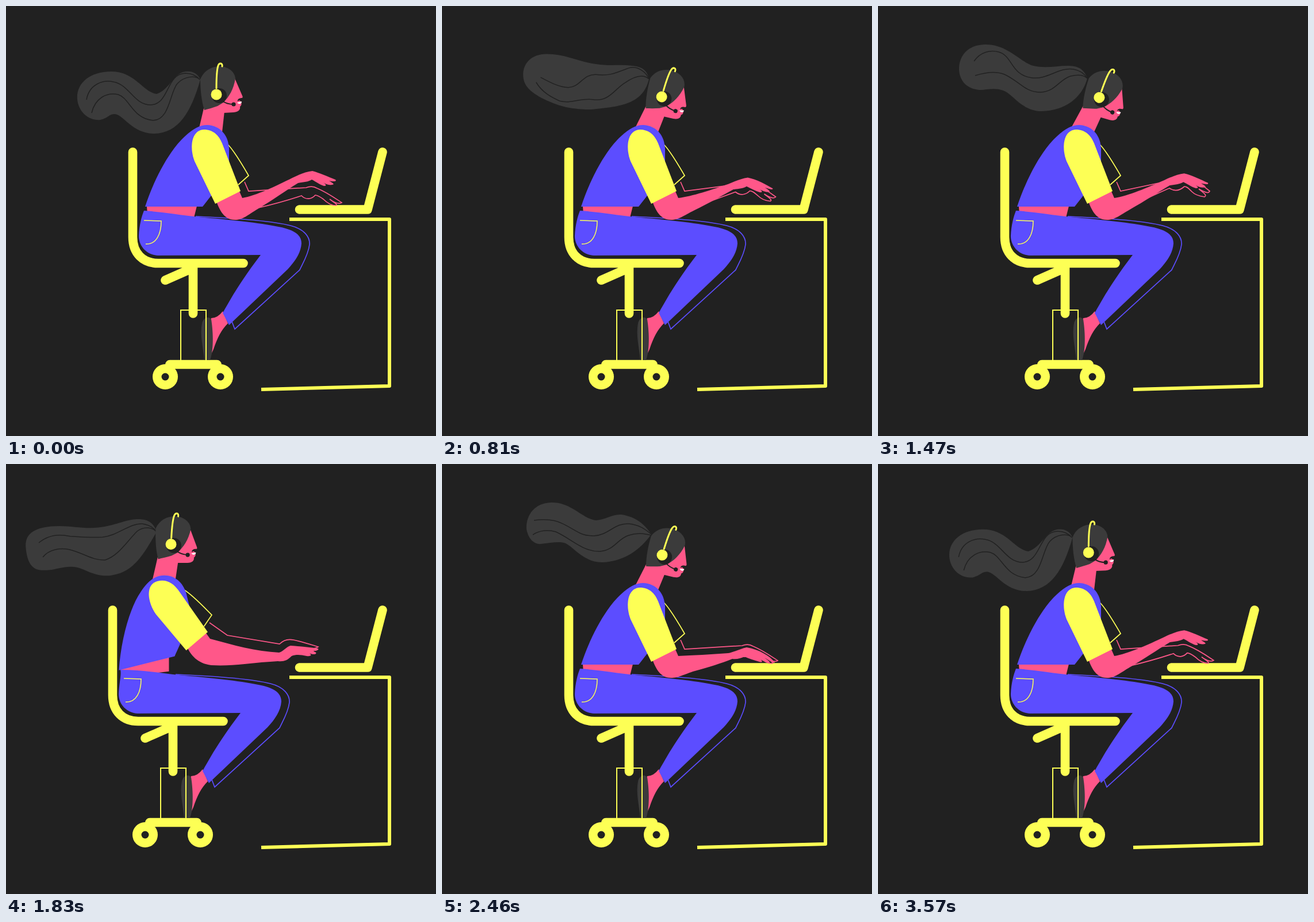
An HTML page for the animation above (3600 ms loop, 748 px wide and 748 px high).

```html
<!DOCTYPE html>
<html lang="en">
<head>
<meta charset="utf-8">
<title>Typing at the desk</title>
<style>
html, body { margin: 0; width: 100%; height: 100%; overflow: hidden; background: #212121; }
svg { display: block; width: 100vw; height: 100vh; }
.y { fill: #fdff55; } .b { fill: #5c4dff; } .p { fill: #ff5789; } .g { fill: #3b3b3b; } .k { fill: #212121; }
.line { fill: none; stroke-width: 1.7; }
.tube { fill: none; stroke-width: 15.6; stroke-linecap: round; stroke-linejoin: round; }
.ys { stroke: #fdff55; } .bs { stroke: #5c4dff; } .ps { stroke: #ff5789; } .ks { stroke: #212121; }
</style>
</head>
<body>
<svg viewBox="0 0 748 748">
  <rect class="k" width="748" height="748"/>
  <path class="line ys" style="stroke-width:6;stroke-linejoin:round" d="M493 371H667V661L444 667"/>
  <path class="tube ys" d="M510.500 354H629L655 254"/>
  <g id="body">
    <g id="chair">
      <path class="tube ys" d="M220.500 254V402C220.500 430 238 447.500 265 447.500H413M277 477L320 458M325.500 455V535M285 623.500H367"/>
      <g class="y"><circle cx="277" cy="645" r="22"/><circle cx="373" cy="645" r="22"/></g>
      <g class="k"><circle cx="277" cy="645" r="6.500"/><circle cx="373" cy="645" r="6.500"/></g>
      <path class="p" d="M377 531L386 552C375 563 368 576 361 597L354 612L350 565L357 543Q368 543 377 531Z"/>
      <path class="g" d="M357 545C351 538 343 543 341 552C337 572 343 595 345 615L355 616C361 600 361 570 357 545Z"/>
      <path class="line ys" style="stroke-width:2" d="M304 617V529H348V617"/>
    </g>
    <path id="neck" class="p"/>
    <g id="torsoBack">
      <path class="p" d="M245 349L248 344H333L326 372L246 362Z"/>
      <path class="line ys" d="M386 241C396 251 411 276 422 295L404 311"/>
      <path class="b" d="M242 349C258 300 285 250 312 226C325 214 337 207 350 207C372 208 387 224 388 248L388 272C384 298 360 326 342 349Z"/>
    </g>
    <path class="line bs" d="M330 366C400 369 463 374 495 382C519 388 529 402 528 415C526 432 515 450 511 459L398 562L393 549"/>
    <path id="pants" class="b"/>
    <path class="line ys" style="stroke-width:1.500" d="M240 373L270 374C270 396 262 415 243 414"/>
    <path id="farArm" class="line ps"/>
    <path id="nearArm" class="p"/>
    <path id="sleeve" class="y" d="M364 344L328 270C319 247 322 216 344 215C361 215 370 225 376 239L408 322Z"/>
    <g id="head">
      <path id="hair" class="g"/>
      <path id="strands" class="line ks" style="stroke-width:1.500"/>
      <path class="p" d="M345 180L360 150L398 126L411 156C413 160 410 161 406 161C404 163 406 165 409 166C410 170 410 173 407 175C408 180 405 184 396 185L378 186Z"/>
      <path class="g" d="M338 128C344 112 358 105 373 105C388 106 398 115 399 126C396 145 388 158 378 168L368 174C360 177 352 179 345 181C340 165 338 145 338 128Z"/>
      <path fill="#fff" d="M402 168L410 166C410 170 406 172 402 168Z"/>
      <path class="k" d="M411 160C406 160 402 162 403 166C405 164 408 163 411 160Z"/>
      <circle class="k" cx="371" cy="156" r="13"/>
      <path class="line ks" style="stroke-width:2" d="M376 165Q384 171 396 171"/>
      <circle class="k" cx="396" cy="171" r="3.600"/>
      <circle class="y" cx="366" cy="154" r="9.500"/>
      <path class="line ys" style="stroke-width:3;stroke-linecap:round" d="M366 143C366 130 366 113 369 104C371 98 377 99 376 105"/>
    </g>
  </g>
</svg>
<script>
const LOOP = 3600, HIP = [276, 397], NECK = [360, 213], TILT = -14;
const $ = id => document.getElementById(id);
const lerp = (a, b, k) => a + (b - a) * k;
const nums = d => d.match(/-?[\d.]+/g).map(Number);
const fill = (shape, values) => { let i = 0; return shape.replace(/-?[\d.]+/g, () => values[i++].toFixed(2)); };
const mix = (a, b, k) => a.map((v, i) => lerp(v, b[i], k));

function turn([x, y], [cx, cy], deg) {
  const a = deg * Math.PI / 180, c = Math.cos(a), s = Math.sin(a);
  return [cx + (x - cx) * c - (y - cy) * s, cy + (x - cx) * s + (y - cy) * c];
}

// Cosine easing through [time, value] pairs
function track(keys, t) {
  let i = 1;
  while (i < keys.length - 1 && keys[i][0] < t) i++;
  const [t0, a] = keys[i - 1], [t1, b] = keys[i];
  const k = Math.min(1, Math.max(0, (t - t0) / (t1 - t0)));
  return lerp(a, b, (1 - Math.cos(Math.PI * k)) / 2);
}

// Alternates 0 and 1 at the given times
const swing = (times, first = 0) => times.map((t, i) => [t, (i + first) % 2]);

const leanKeys = [[1620, 0], [1860, 1.04], [2160, 1.04], [2430, 0]];
const nodKeys = [[540, 0], [840, 16.5], [1470, 19], [1620, 19], [1830, 3], [2160, 3], [2430, 17], [3240, 17], [3600, 0]];
const nearKeys = [
  ...swing([0, 185, 370, 555, 740, 912, 1085, 1257, 1430, 1600]),
  ...swing([2460, 2616, 2772, 2928, 3084, 3240, 3420, 3600], 1)
];
const farKeys = [
  ...swing([0, 190, 380, 560, 740, 880, 1035, 1180, 1325, 1470, 1620]),
  ...swing([2460, 2616, 2772, 2928, 3084, 3280, 3600])
];

const near = {
  up: "M366 340C372 356 380 372 398 372C412 372 420 364 438 353C465 337 485 322 508 308C518 306 526 306 532 302C540 306 546 311 553 313C559 313 556 310 552 307C558 311 563 312 567 311C573 310 568 308 562 304C570 306 576 305 573 302C560 297 545 290 533 287C522 288 510 293 498 299C470 313 435 330 411 334L404 318Z",
  down: "M366 340C372 356 380 372 398 372C412 372 420 366 440 360C465 353 485 347 505 339C513 340 520 338 526 335C535 339 543 341 552 344C559 346 558 342 551 338C558 343 565 345 569 346C573 346 567 341 561 337C570 342 578 348 579 345C570 334 553 323 530 319C520 321 508 327 498 329C470 331 435 333 411 334L404 318Z",
  back: "M350 318C356 332 368 347 392 350C412 351 430 350 450 348C470 346 490 344 508 343C518 344 524 342 532 334C540 331 548 332 558 334C566 335 568 332 562 329C567 331 572 332 574 330C576 328 572 326 566 325C574 326 580 324 578 321C562 319 545 317 530 316C522 318 518 326 510 328C470 326 430 315 390 304L380 290Z"
};
const far = {
  down: "M415 306L422 322L522 316C530 313 536 314 541 317C558 324 572 334 584 342C578 346 568 340 563 336C571 342 578 346 574 347C566 347 558 342 552 336C545 331 541 329 538 329C532 336 522 338 514 330C490 338 465 345 435 352",
  up: "M415 306L422 322L507 304C520 299 532 297 540 301C555 306 568 314 577 322C575 328 565 322 558 318C566 325 573 329 568 332C560 331 552 329 546 323C541 318 538 314 533 314C525 321 516 323 507 317C490 324 465 336 435 350",
  back: "M389 276L420 298L511 313C518 306 526 304 535 306C550 309 565 314 578 318C573 322 565 322 560 322C568 323 572 326 568 328C560 330 552 330 546 328C540 326 536 328 532 332C525 336 515 340 507 341C490 342 450 346 420 346"
};

// Ponytail outline and two strands, each with the time of its head pose
const hairShapes = {
  curl: [0, "M338 128C332 112 312 110 300 119C288 128 280 147 262 153C238 150 225 114 183 114C145 114 122 135 124 162C126 185 145 200 164 198C180 194 178 188 190 188C205 190 220 222 258 222C300 221 322 185 338 128Z|M140 163C145 135 170 128 187 132C215 137 222 172 252 172C285 170 278 118 312 117C325 117 333 123 337 128M149 186C155 160 175 150 195 154C215 160 220 196 256 199C285 198 285 150 298 135C310 122 330 120 337 128"],
  wide: [810, "M360 127C356 108 345 106 328 104C310 102 290 105 268 101C240 98 215 84 182 84C155 84 141 100 141 120C141 140 155 150 172 160C185 167 200 174 215 177C225 179 245 181 262 180C310 175 350 172 360 127Z|M172 125C190 135 205 143 220 143C240 143 245 118 268 119C290 122 300 118 325 108C340 103 355 115 360 127M164 133C175 152 190 160 205 167C225 172 240 160 262 163C290 168 300 145 318 134C335 122 350 118 360 127"],
  lift: [1470, "M364 126C358 108 346 104 330 104C310 104 292 109 270 104C245 96 225 66 185 67C155 68 140 88 141 112C143 135 160 146 180 146C200 144 205 143 218 147C235 153 250 183 285 183C325 182 355 160 364 126Z|M167 96C178 80 195 76 210 80C235 87 230 120 268 125C295 128 315 106 340 110C352 112 360 119 364 126M169 121C185 116 205 113 220 119C245 130 255 150 283 150C310 148 315 128 335 122C348 119 358 120 364 126"],
  flat: [1830, "M262 118C256 100 245 96 228 96C205 97 190 107 160 110C130 113 108 106 78 109C48 112 33 122 34 144C36 172 45 185 62 185C85 186 92 179 115 179C135 179 150 196 180 194C220 190 238 160 262 118Z|M57 137C75 122 95 122 112 126C140 128 150 128 168 127C195 124 215 103 237 104C250 106 258 112 262 118M64 162C75 148 95 146 110 149C135 155 150 168 172 167C195 160 210 135 228 117C240 108 255 110 262 118"],
  slim: [2460, "M364 122C352 105 338 92 312 88C295 87 285 97 268 98C245 96 225 66 190 67C160 68 146 90 147 113C150 130 160 140 172 139C190 137 205 134 215 138C230 145 245 170 278 171C315 170 345 150 364 122Z|M160 98C175 96 195 96 210 104C235 116 240 125 264 125C290 124 300 102 325 104C345 106 355 115 364 122M158 123C170 115 185 114 198 118C225 130 245 153 275 152C300 150 305 130 325 124C340 119 352 121 364 124"],
  roll: [3180, "M362 126C356 110 350 105 338 107C320 112 305 128 290 131C265 128 250 66 200 64C165 64 147 85 148 110C152 133 170 142 188 142C200 140 203 136 210 141C225 160 235 194 275 195C320 193 350 160 362 126Z|M163 101C172 88 185 84 200 88C225 94 235 125 265 130C295 132 315 108 338 109C350 110 358 118 362 126M166 125C178 110 195 104 210 109C235 120 245 158 280 158C310 156 320 125 335 122C345 118 356 119 362 126"]
};

function pose(t) {
  const lean = track(leanKeys, t), nod = track(nodKeys, t);
  return { lean, nod, slide: -35 * lean, neck: turn(NECK, HIP, TILT * lean) };
}

// Bring each ponytail into the frame of the upright head
const hair = {};
for (const [name, [time, d]] of Object.entries(hairShapes)) {
  const q = pose(time), v = nums(d);
  const dx = NECK[0] - q.neck[0] - q.slide, dy = NECK[1] - q.neck[1];
  for (let i = 0; i < v.length; i += 2) {
    [v[i], v[i + 1]] = turn([v[i] + dx, v[i + 1] + dy], NECK, -q.nod);
  }
  hair[name] = v;
}

// Seven waves per loop; the fourth one trails behind the rolling chair
function hairAt(t) {
  const turns = t / LOOP * 7, cycle = Math.floor(turns), ph = turns - cycle;
  const keys = [[0, "curl"], [.18, "roll"], [.567, cycle === 3 ? "flat" : "wide"], [.783, "slim"], [.858, "lift"], [.945, "curl"], [1, "curl"]];
  const i = keys.findIndex(k => k[0] > ph);
  const [a, from] = keys[i - 1], [b, to] = keys[i];
  return mix(hair[from], hair[to], (ph - a) / (b - a));
}

const nearUp = nums(near.up), nearDown = nums(near.down), nearBack = nums(near.back);
const farUp = nums(far.up), farDown = nums(far.down), farBack = nums(far.back);

function draw(t) {
  const { lean, nod, slide, neck } = pose(t);
  const torso = `rotate(${TILT * lean} ${HIP})`;
  $("body").setAttribute("transform", `translate(${slide} 0)`);
  $("torsoBack").setAttribute("transform", torso);
  $("sleeve").setAttribute("transform", torso);
  $("head").setAttribute("transform", `translate(${neck}) rotate(${nod}) translate(${-NECK[0]} ${-NECK[1]})`);

  const onHead = p => {
    const [x, y] = turn(p, NECK, nod);
    return [x + neck[0] - NECK[0], y + neck[1] - NECK[1]];
  };
  const onTorso = p => turn(p, HIP, TILT * lean);
  const pts = [onHead([344, 178]), onHead([362, 165]), onHead([380, 183]), onTorso([376, 219]), onTorso([336, 212])];
  $("neck").setAttribute("d", "M" + pts.join("L") + "Z");

  const waist = `${240 - 6 * lean} ${356 + 2 * lean}`;
  $("pants").setAttribute("d", `M${waist}C270 358 300 363 335 367C390 372 440 377 474 384C501 389 514 398 514 413C513 430 502 445 490 458L388 555L377 534C393 505 411 475 443 433L264 434C245 433 231 418 231 400C232 380 236 366 ${waist}Z`);

  const nearPts = mix(mix(nearUp, nearDown, track(nearKeys, t)), nearBack, lean);
  const farPts = mix(mix(farDown, farUp, track(farKeys, t)), farBack, lean);
  $("nearArm").setAttribute("d", fill(near.up, nearPts));
  $("farArm").setAttribute("d", fill(far.down, farPts));

  const [outline, lines] = fill(hairShapes.curl[1], hairAt(t)).split("|");
  $("hair").setAttribute("d", outline);
  $("strands").setAttribute("d", lines);
}

const start = performance.now();
function tick() {
  const t = (performance.now() - start) % LOOP;
  draw(Math.floor(t / 30) * 30);
  requestAnimationFrame(tick);
}
tick();
</script>
</body>
</html>
```
